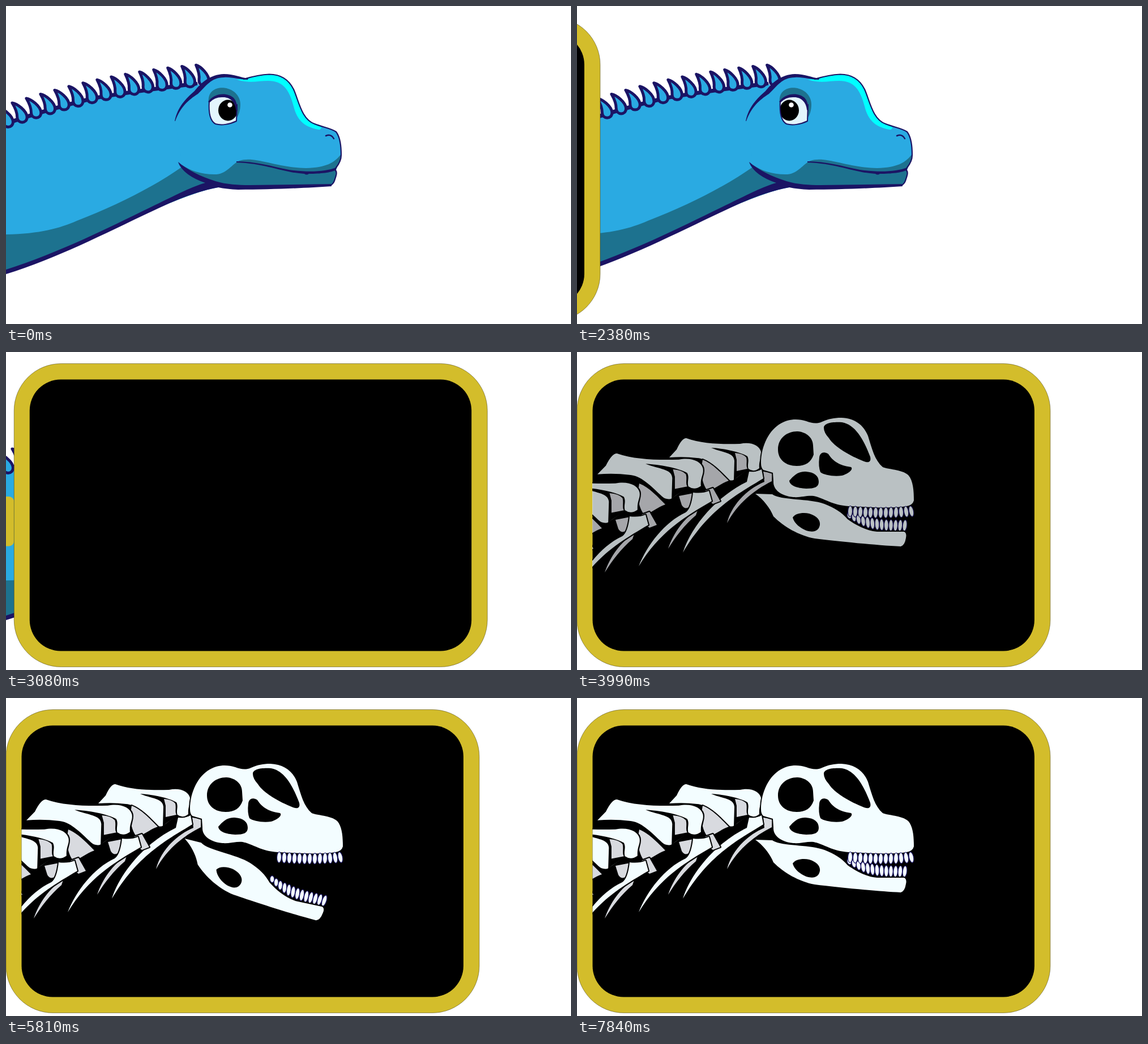
Write an HTML page that moves like this. It is 998 by 561 pixels and loops after 8470 ms.

```html
<!DOCTYPE html>
<html lang="en">
<head>
<meta charset="utf-8">
<title>Dinosaur scan</title>
<style>
  html, body { margin: 0; width: 100%; height: 100%; overflow: hidden; background: #fff; }
  svg { display: block; width: 100vw; height: 100vh; }
  .skin { fill: #2aaae2; }
  .shade { fill: #1d728f; }
  .ink { fill: #1b1464; }
  .line { fill: none; stroke: #1b1464; stroke-linecap: round; stroke-linejoin: round; }
  .bone { fill: #f3fdff; stroke: #000; stroke-width: 4; paint-order: stroke; stroke-linejoin: round; }
  .far { fill: #d8dadf; stroke: #000; stroke-width: 4; paint-order: stroke; stroke-linejoin: round; }
  .tooth { fill: #f3fdff; stroke: #1b1464; stroke-width: 1.2; }
</style>
</head>
<body>
<svg viewBox="0 0 998 561" preserveAspectRatio="none">
  <defs>
    <clipPath id="eyeClip"><path d="M359 168C370 155 402 154 408 174L407 203C395 209 380 211 370 208C359 202 358 182 359 168Z"/></clipPath>
    <clipPath id="screenClip"><rect x="27.5" y="48.5" width="780.5" height="479" rx="55"/></clipPath>

    <g id="vertebra">
      <path class="bone" d="M163 186L176 172Q185 152 193 152C220 162 255 163 288 162C308 158 322 165 325 176C327 186 321 190 322 205Q312 213 303 206L283 221L276 226Q268 228 262 222C245 205 230 188 212 187Q190 184 163 186Z"/>
      <path d="M237 169C258 170 288 176 301 184C305 192 300 198 303 207L283 221L277 226L278 192C277 177 258 178 237 169Z"/>
      <path fill="#d8dadf" d="M279 178Q293 179 299 186C301 194 298 200 301 206L282 210L282 190Z"/>
    </g>

    <g id="segment">
      <path class="far" d="M222 190C240 197 256 215 268 227C254 232 245 240 232 246C222 236 217 215 222 190Z"/>
      <path class="far" d="M226 245L240 240L253 263L240 268L230 260Z"/>
      <path class="far" d="M180 254L206 249L199 273Q190 279 185 270Z"/>
      <path class="far" d="M213 279C190 291 170 320 161 347C174 326 190 305 210 288Z"/>
      <path class="bone" d="M205 248Q222 250 233 245L238 263C190 291 145 318 109 378C124 340 155 300 192 283Q202 276 205 248Z"/>
      <use href="#vertebra" transform="matrix(1.15 0 0 1.08 -151.4 14.8)"/>
    </g>
  </defs>

  <g id="dino">
    <path class="skin" d="M0 207C53 189 103 175 153 163C204 154 255 147 340 138L420 320L375 320C290 335 150 420 0 468Z"/>
    <path class="shade" d="M0 403C60 402 95 392 125 379C200 350 262 318 312 283L380 318C290 335 150 420 0 468Z"/>
    <path class="line" stroke-width="7" d="M-5 209C53 189 103 175 153 163C204 154 255 147 335 137"/>
    <g id="spikes" class="line" stroke-width="5" style="fill:#2aaae2"></g>

    <path class="skin" d="M299 203C306 178 320 163 336 152C348 137 360 123 385 123C402 123 414 128 427 129C440 123 450 121 465 121C486 121 500 131 508 147C517 167 522 200 545 208C560 214 575 216 583 222C591 232 592 250 592 263L583 289L584 297C582 305 580 314 574 316L420 321L375 318C350 306 330 300 312 283Z"/>
    <path fill="#0ff" d="M408 130C430 126 445 121 465 121C486 121 500 131 508 147C517 167 522 199 545 207L554 210A4 4 0 0 1 552 218C525 213 514 200 508 177C501 149 490 132 463 132C445 132 430 137 408 130Z"/>
    <path class="shade" d="M309 279C325 291 348 298 372 297C391 295 399 279 412 273C440 264 475 285 530 286C565 285 580 277 592 261L590 273L583 289L584 297C582 305 580 314 574 316L420 319C380 317 340 307 309 279Z"/>
    <path class="ink" d="M304 275C320 289 344 301 370 309C390 315 410 316 430 316L574 314L575 318C530 321 470 324 410 324Q390 323 375 320C348 325 320 334 286 349C190 393 100 442 0 473L0 465C100 433 185 389 270 348C305 331 328 319 352 312C330 305 309 291 304 275Z"/>
    <path class="ink" d="M407 274C440 274 470 283 500 289C535 294 565 292 583 285L583 289C575 294 555 296 535 296Q531 299 527 296C490 294 460 278 407 276Z"/>
    <path class="line" stroke-width="2.2" d="M420 129C440 123 450 121 465 120.500C486 120.500 500 131 508 147C517 167 522 200 545 208C560 214 575 216 583 222C591 232 592 250 592 263C592 272 588 279 583 285L581 289Q585 292 583 299C580 309 579 313 574 316"/>
    <path class="ink" d="M298 203C303 178 318 163 333 150C345 135 360 121 385 120C402 120 414 126 428 128L427 130C410 130 400 125 385 126C362 126 353 142 339 155C322 166 308 178 299 203Z"/>
    <path class="line" stroke-width="2.500" d="M565 229Q574 225 579 234"/>

    <path class="shade" d="M358 172C355 150 371 143 386 144.500C404 147 414 160 414 174C414 184 411 193 407 198Z"/>
    <path fill="#e3f5fd" d="M359 168C370 155 402 154 408 174L407 203C395 209 380 211 370 208C359 202 358 182 359 168Z"/>
    <g clip-path="url(#eyeClip)">
      <g id="pupil">
        <ellipse cx="392" cy="184" rx="17" ry="18.5"/>
        <circle cx="395.500" cy="174.500" r="4.300" fill="#fff"/>
      </g>
    </g>
    <path class="line" stroke-width="2" d="M359 168C358 182 359 202 370 208C380 211 395 209 407 203L408 174"/>
    <path class="ink" d="M357 169C366 154 390 151 402 162Q409 169 409 186L406 183C405 170 396 161 384 161Q369 160 360 170Z"/>
  </g>

  <g id="screen">
    <g fill="#d3bd2b">
      <rect x="-300" y="255" width="300" height="87.500" rx="9"/>
      <rect x="0" y="20.500" width="836" height="535" rx="83" stroke="#3c3610" stroke-width=".5"/>
    </g>
    <rect x="27.500" y="48.500" width="780.500" height="479" rx="55"/>
  </g>

  <g clip-path="url(#screenClip)">
    <g id="skeleton">
      <path class="far" d="M329 211L345 213L344 228C312 244 283 268 265 302C272 272 298 243 331 229Z"/>
      <path class="bone" d="M304 211Q318 212 326 207L329 223C285 250 232 277 187 354C203 304 250 253 300 229Z"/>
      <use href="#vertebra"/>
      <use href="#segment"/>
      <use href="#segment" x="-112" y="42"/>
      <use href="#segment" x="-224" y="84"/>
      <g id="jaw">
        <g id="lowerTeeth"></g>
        <path class="bone" fill-rule="evenodd" d="M315 250L345 251C360 262 410 258 437 268C455 275 468 283 478 295C492 305 510 315 530 317L578 317Q583 320 581 328Q579 341 572 343C530 341 460 334 420 329C392 324 365 308 347 290C341 275 329 260 315 250ZM381 292C386 284 400 283 410 285C424 289 430 297 429 305C427 316 418 319 405 315C395 311 384 303 381 292Z"/>
      </g>
      <path class="bone" d="M325 196C325 165 340 137 360 126C373 118 390 117 405 122C415 126 424 127 433 123C445 118 453 116 467 116C490 117 506 128 514 148C521 171 526 191 540 203C548 207 574 207 585 217C594 227 595 245 595 262Q593 270 582 272C550 277 510 273 480 272C450 270 437 258 418 254C404 253 396 257 382 256C362 254 346 244 347 228L346 213L329 208Q325 204 325 196Z"/>
      <path d="M355 172C355 152 371 140 389 140C407 141 417 153 417 165L418 181C413 195 404 201 388 201C369 201 355 190 355 172Z"/>
      <path d="M436 134C436 125 451 123 468 124C491 128 506 153 518 185C520 194 515 196 507 193C482 183 455 168 445 152Q436 142 436 134Z"/>
      <path d="M428 186C429 177 437 175 444 180C454 196 469 201 484 203C489 207 479 215 468 218C453 220 436 217 430 212Q426 202 428 186Z"/>
      <path d="M375 227C382 219 390 210 404 211C420 212 427 219 427 229C427 238 420 241 405 241C388 240 376 236 375 227Z"/>
      <g id="upperTeeth"></g>
    </g>
  </g>
</svg>
<script>
  const STEP = 70, LOOP = 8470;
  const $ = id => document.getElementById(id);
  const clamp = v => Math.max(0, Math.min(1, v));
  const smooth = p => (1 - Math.cos(Math.PI * p)) / 2;
  const progress = (t, from, to) => clamp((t - from) / (to - from));
  const repeat = (n, draw) => Array.from({ length: n }, (_, i) => draw(i)).join('');
  const tooth = (x, y, rx, ry, turn) =>
    `<ellipse class="tooth" rx="${rx}" ry="${ry}" transform="translate(${x} ${y}) rotate(${turn})"/>`;

  $('spikes').innerHTML = repeat(15, i => {
    const j = 14 - i;
    return `<path d="M2 2C10 3 28 15 28.500 27C28 39 12 39 11 27C11 20 7 10 2 2Z"
      transform="translate(${334 - 25 * j} ${102 + 2.03 * j + 0.24 * j * j}) rotate(${i * 0.6})"/>`;
  });
  $('upperTeeth').innerHTML = repeat(13, i =>
    tooth(482.5 + i * 9, 281 + 2.5 * Math.sin(Math.PI * i / 12), 4, 9.5, i > 9 ? -8 * (i - 9) / 2 : 2));
  $('lowerTeeth').innerHTML = repeat(13, i => {
    const u = i / 12;
    return tooth(481 + 98 * u, 306 - 18 * (1 - u) ** 3, 3.8, 6 + 4 * Math.min(1, u * 3), -12 + 18 * u);
  });

  // One full opening and closing of the mouth.
  const bite = (t, from, to) => 6 * (1 - Math.cos(2 * Math.PI * progress(t, from, to)));

  function slide(t) {
    return t < 2940
      ? -885 + 942 * smooth(progress(t, 2240, 2940))
      : 57 * (1 - smooth(progress(t, 2940, 3150)));
  }

  function render(now) {
    const t = Math.floor((now % LOOP) / STEP) * STEP;
    const look = -17 * smooth(progress(t, 1050, 1610));
    const angle = bite(t, 5250, 6370) + bite(t, 6860, 7840);
    $('pupil').setAttribute('transform', `translate(${look} 0)`);
    $('screen').setAttribute('transform', `translate(${slide(t)} 0)`);
    $('screen').setAttribute('visibility', t < 2380 ? 'hidden' : 'visible');
    $('skeleton').setAttribute('opacity', Math.sin(Math.PI / 2 * progress(t, 3290, 4550)));
    $('jaw').setAttribute('transform', `rotate(${angle} 325 252)`);
  }

  const start = performance.now();
  function tick() {
    render(performance.now() - start);
    requestAnimationFrame(tick);
  }
  tick();
</script>
</body>
</html>
```
